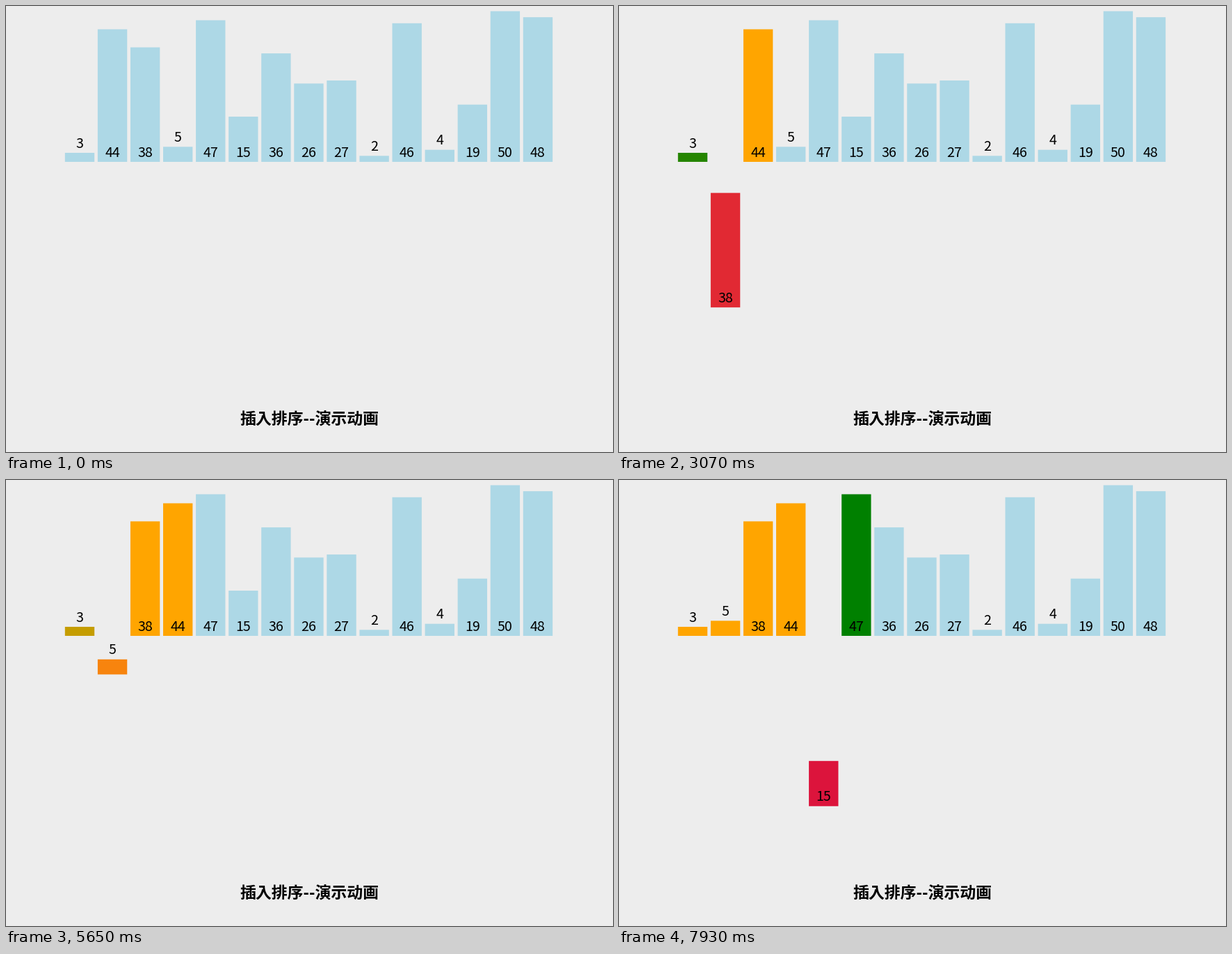
Recreate the animation shown at these times as a matplotlib script. Size 873x641 px, loop 8 s.

```python
import numpy as np
import matplotlib.pyplot as plt
from matplotlib.animation import FuncAnimation
from matplotlib.colors import to_rgb
from matplotlib.patches import Rectangle

W, H, DPI = 873, 641, 100
LOOP, TICK = 8000, 20
VALUES = [3, 44, 38, 5, 47, 15, 36, 26, 27, 2, 46, 4, 19, 50, 48]

# Bar layout in pixels
SCALE = 0.9414
PITCH, BAR_W, UNIT = 50 * SCALE, 45 * SCALE, 4.6 * SCALE
LEFT, BASE, DROP = 84.8, 224, 260 * SCALE

# One sorting step starts every CADENCE ms and moves for DURATION ms
FIRST, CADENCE, DURATION = 120, 358.4, 250

BLUE, ORANGE, GREEN, RED = map(to_rgb, ("lightblue", "orange", "green", "crimson"))


def sort_states(values):
    """Rows of (slot, drop, r, g, b) for every bar after each sorting step."""
    now = np.array([(i, 0, *BLUE) for i in range(len(values))], float)
    states = [now.copy()]

    def save():
        states.append(now.copy())

    now[0, 2:] = ORANGE
    save()
    order = list(range(len(values)))
    for key in range(1, len(values)):
        j, compared = key - 1, None
        now[key, 1:] = (1, *RED)
        save()
        while j >= 0:
            if compared is not None:
                now[compared, 2:] = ORANGE
            compared = order[j]
            now[compared, 2:] = GREEN
            save()
            if values[compared] <= values[key]:
                break
            now[compared, 0], now[key, 0] = j + 1, j
            order[j + 1], order[j] = compared, key
            save()
            j -= 1
        now[compared, 2:] = ORANGE
        now[key, 1:] = (0, *ORANGE)
        save()
    return states


def ease(t):
    """Cubic ease in and out."""
    t = min(max(t, 0), 1)
    return 4 * t ** 3 if t < 0.5 else 1 - 4 * (1 - t) ** 3


def pose(t):
    step, since = divmod(max(t - FIRST, 0), CADENCE)
    f = ease(since / DURATION)
    return STATES[int(step)] * (1 - f) + STATES[int(step) + 1] * f


STATES = sort_states(VALUES)

plt.rcParams["font.family"] = "Noto Sans CJK JP"
fig = plt.figure(figsize=(W / DPI, H / DPI), dpi=DPI, facecolor="#ededed")
ax = fig.add_axes([0, 0, 1, 1])
ax.set_xlim(0, W)
ax.set_ylim(H, 0)
ax.axis("off")


def write(x, y, text, px, **style):
    return ax.text(x, y, text, size=px * 72 / DPI, ha="center",
                   va="baseline", color="black", **style)


write(W / 2, 601, "插入排序--演示动画", 22.9, weight="bold")
bars = [ax.add_patch(Rectangle((0, 0), BAR_W, v * UNIT, lw=0, snap=False))
        for v in VALUES]
labels = [write(0, 0, str(v), 19.7) for v in VALUES]


def draw(i):
    rows = pose(i * TICK + TICK / 2)
    for value, bar, label, (slot, drop, *rgb) in zip(VALUES, bars, labels, rows):
        x, bottom = LEFT + PITCH * slot, BASE + DROP * drop
        top = bottom - value * UNIT
        bar.set_xy((x, top))
        bar.set_facecolor(np.clip(rgb, 0, 1))
        # Short bars carry their number on top
        label.set_position((x + BAR_W / 2, (top if value < 10 else bottom) - 7.4))
    return bars + labels


anim = FuncAnimation(fig, draw, frames=LOOP // TICK, interval=TICK,
                     repeat=True, repeat_delay=0, blit=False)
plt.show()
```
